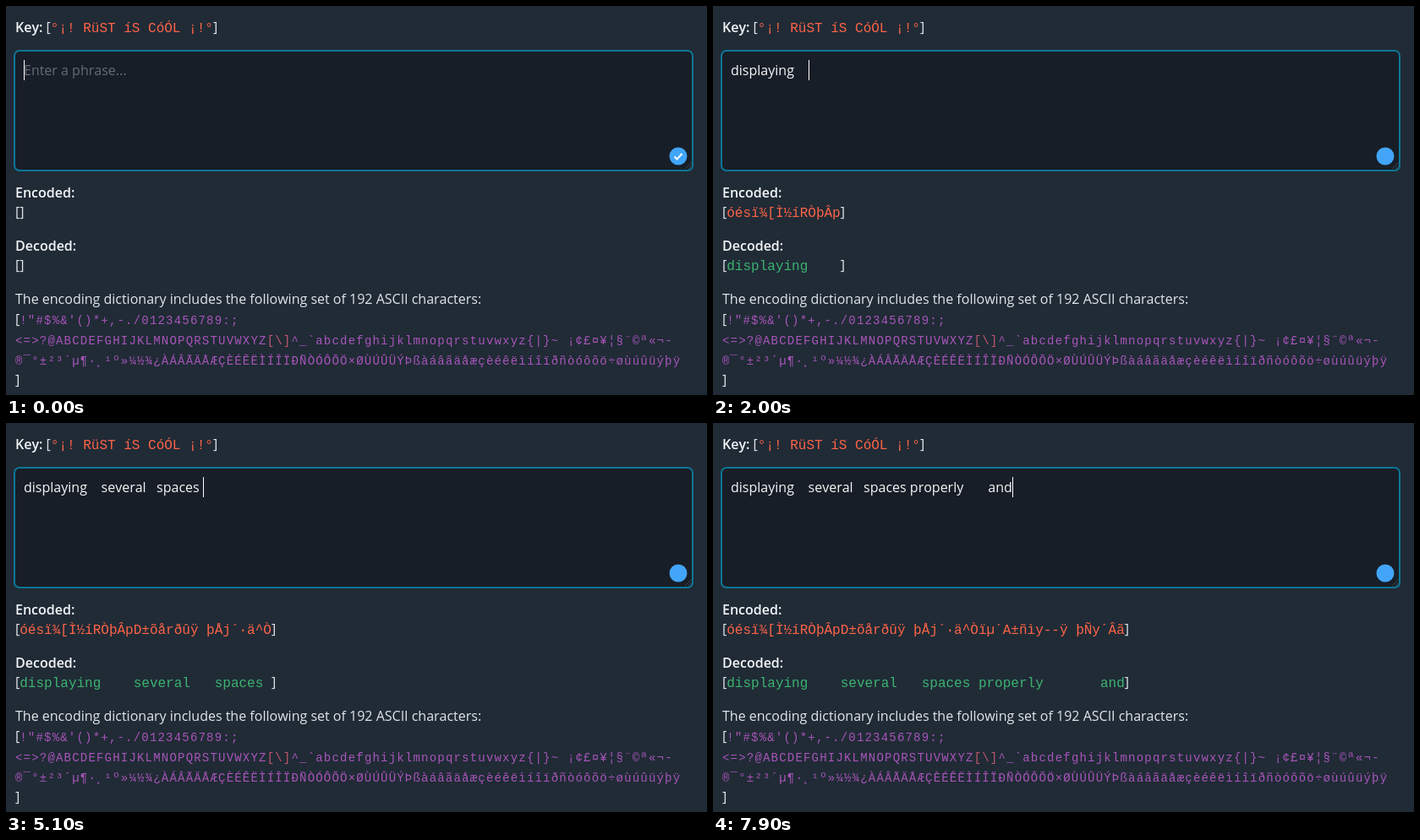
Animation of 829x461 px, one loop 8 s. Source, as an HTML page:

```html
<!DOCTYPE html>
<html lang="en">
<head>
<meta charset="utf-8">
<title>Phrase encoder</title>
<style>
  html, body { margin: 0; width: 100%; height: 100%; overflow: hidden; background: #202b36; }
  body { position: relative; color: #e1e5e9; font: 16px/24px "Open Sans", sans-serif; font-kerning: none; }
  .line { position: absolute; left: 11px; white-space: pre; }
  b { font-weight: 600; color: #f4f7f9; }
  code { font: 16px/0 "Liberation Mono", monospace; }
  .red { color: #ff6347; }
  .green { color: #3cb371; }
  .dict { font-size: 14px; letter-spacing: 1.2px; color: #a955ba; }
  .dict i { font-style: normal; color: #c4586f; }
  #box { position: absolute; left: 9px; top: 52px; width: 804px; height: 144px; box-sizing: border-box;
    border: 2px solid #0d7696; border-radius: 7px; background: #181e27; }
  #phrase { left: 21px; color: #f4f6f8; }
  #hint { left: 21px; color: #656b73; }
  #caret { position: absolute; top: 0; right: -1px; width: 1px; height: 24px; background: #fff; }
  svg { position: absolute; left: 0; top: 0; }
</style>
</head>
<body>
<div class="line" style="top:13px"><b>Key:</b> [<code class="red">°¡! RüST íS CóÓL ¡!°</code>]</div>
<div id="box"></div>
<div class="line" id="hint" style="top:64px">Enter a phrase...</div>
<div class="line" id="phrase" style="top:64px"><span id="typed"></span><span id="caret"></span></div>
<svg width="829" height="461" fill="none">
  <path d="M803 193l8-8M807 193l4-4" stroke="#3c454e"/>
  <circle cx="795" cy="178" r="10.5" fill="#42a5f8"/>
  <path id="check" d="M790.5 178.5l3 3 6-6.5" stroke="#fff" stroke-width="2"/>
</svg>
<div class="line" style="top:209px"><b>Encoded:</b></div>
<div class="line" style="top:232px">[<code class="red" id="encoded"></code>]</div>
<div class="line" style="top:272px"><b>Decoded:</b></div>
<div class="line" style="top:295px">[<code class="green" id="decoded"></code>]</div>
<div class="line" style="top:335px">The encoding dictionary includes the following set of 192 ASCII characters:</div>
<div class="line" style="top:359px">[<code class="dict" id="row1"></code></div>
<div class="line" style="top:383px"><code class="dict" id="row2"></code></div>
<div class="line" style="top:407px"><code class="dict" id="row3"></code></div>
<div class="line" style="top:431px">]</div>
<script>
  const $ = id => document.getElementById(id);
  const LOOP = 8000;
  const plain = "displaying    several   spaces properly       and";
  const cipher = "óésï¾[Ì½íRÒþÂpD±õårðûÿ þÅj´·ä^Òïµ`A±ñìy--ÿ þÑy´Âã";

  // Key press times in tenths of a second, one per character
  const keys = [
    3, 5, 6, 7, 9, 10, 12, 13, 14, 15,
    17, 18, 19, 20, 22, 23, 27, 27, 27, 29, 31,
    33, 36, 38, 41, 42, 43, 45, 46, 47,
    49, 53, 55, 56, 57, 59, 60, 62, 65,
    66, 67, 69, 70, 72, 73, 74, 76, 77, 79
  ];
  // The array is one press per character, so spaces are listed too
  const spaced = keys;

  const range = (from, to) =>
    Array.from({ length: to - from + 1 }, (_, i) => String.fromCharCode(from + i)).join("");

  $("row1").textContent = range(0x21, 0x3b);
  const marked = document.createElement("i");
  marked.textContent = "[\\]";
  $("row2").append(range(0x3c, 0x5a), marked, range(0x5e, 0x7e) + range(0xa0, 0xac) + "-");
  $("row3").textContent = range(0xae, 0xff);

  let shown = -1;
  function draw(ms) {
    const count = spaced.filter(k => k * 100 <= ms).length;
    $("check").style.display = ms < 500 ? "" : "none";
    if (count === shown) return;
    shown = count;
    $("hint").style.display = count ? "none" : "";
    $("typed").textContent = $("decoded").textContent = plain.slice(0, count);
    $("encoded").textContent = cipher.slice(0, count);
  }

  const start = performance.now();
  function tick() {
    draw((performance.now() - start) % LOOP);
    requestAnimationFrame(tick);
  }
  draw(0);
  requestAnimationFrame(tick);
</script>
</body>
</html>
```
